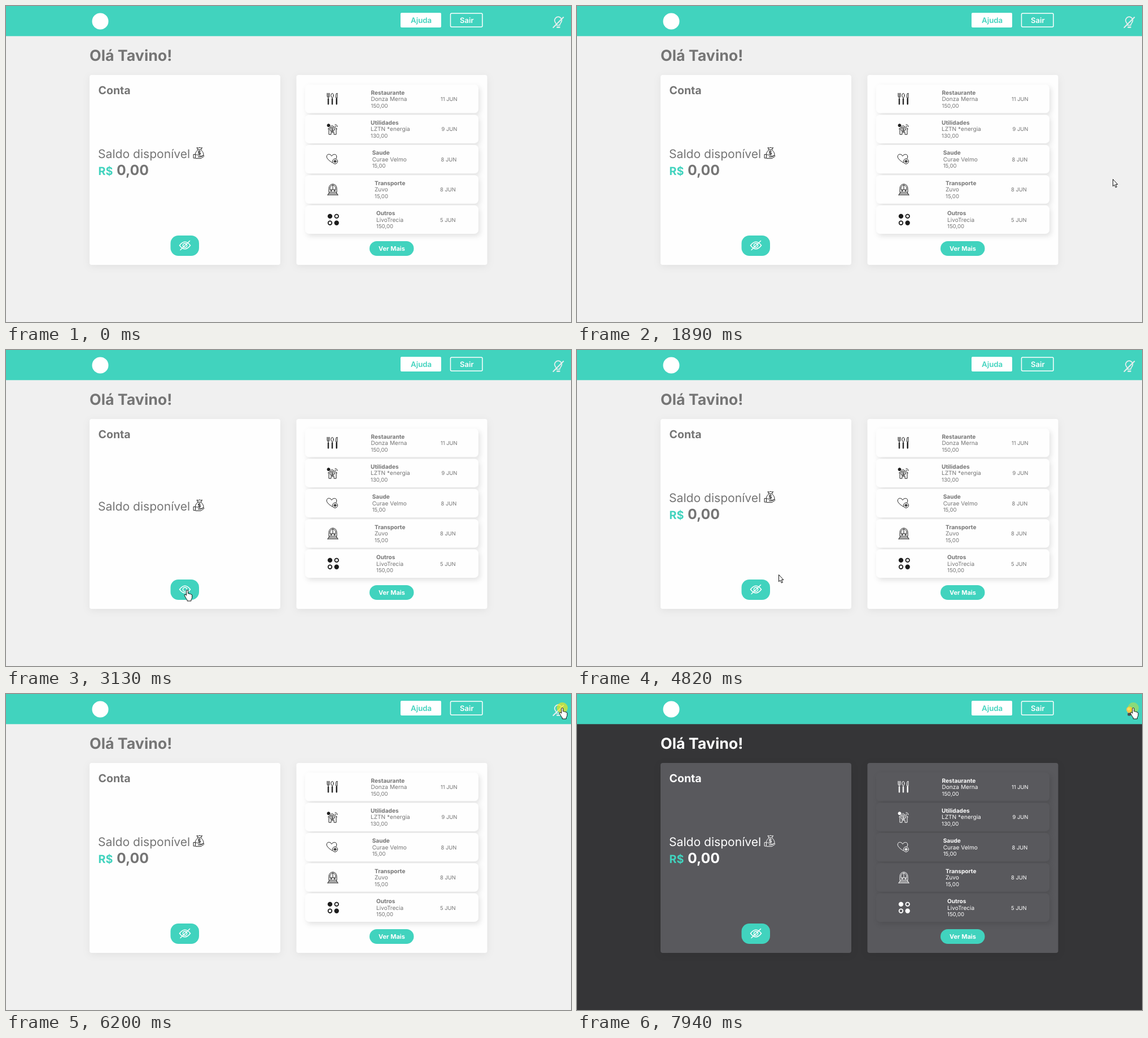
Recreate the animation shown at these times as an HTML page. Size 1001x559 px, loop 8000 ms.

```html
<!DOCTYPE html>
<html lang="pt-BR">
<head>
<meta charset="utf-8">
<title>Conta</title>
<style>
html, body { margin: 0; width: 100%; height: 100%; overflow: hidden; }
svg { display: block; width: 100vw; height: 100vh; font-family: Inter, sans-serif; text-rendering: geometricPrecision;
  --page: #f0f0f0; --card: #fefefe; --text: #757575; --ink: #1d1d1d; }
svg.dark { --page: #353537; --card: #59595d; --text: #fff; --ink: #fff; }
.page { fill: var(--page); }
.card { fill: var(--card); filter: drop-shadow(0 3px 7px #0000000f); }
.row { fill: var(--card); filter: drop-shadow(3px 4px 5px #0000001c); }
text { fill: var(--text); }
.teal { fill: #41d3be; }
.white { fill: #fff; }
.bold { font-weight: 700; }
.semi { font-weight: 600; }
.icon { fill: none; stroke: var(--ink); stroke-width: 1; stroke-linecap: round; stroke-linejoin: round; }
.icon .solid { fill: var(--ink); }
.icon text { fill: var(--ink); stroke: none; font-weight: 700; text-anchor: middle; }
.line { fill: none; stroke: #fff; stroke-width: 1.5; stroke-linecap: round; }
.pointer { fill: #fff; stroke: #111; stroke-width: 1; stroke-linejoin: round; }
</style>
</head>
<body>
<svg id="stage" viewBox="0 0 1001 559" preserveAspectRatio="none">
  <rect class="page" width="1001" height="559"/>
  <rect class="teal" width="1001" height="53.3"/>
  <circle class="white" cx="167" cy="27" r="14.5"/>

  <rect class="white" x="699" y="12" width="72" height="26" rx="2"/>
  <text class="teal semi" x="717" y="29.7" font-size="13.3">Ajuda</text>
  <rect class="line" x="787.5" y="13" width="56.5" height="24" rx="2"/>
  <text class="white semi" x="804" y="29.7" font-size="13.1">Sair</text>

  <g id="bulbOff" fill="none" stroke="#e9eeee" stroke-width="1.7" stroke-linecap="round">
    <path d="M975.5 34C975 30 972 29 972 25.5a6.3 6.3 0 0 1 12.6 0C984.600 29 981.500 30 981 34Z"/>
    <path d="M976.500 37.500h4" stroke-width="2.500"/>
    <path d="M969.500 38L987.500 20" stroke-width="2"/>
  </g>
  <g id="bulbOn">
    <path d="M976 33.500c0-2-2.700-3-2.700-6a5.300 5.300 0 0 1 10.600 0c0 3-2.700 4-2.700 6z" fill="#fbc04a"/>
    <circle cx="977.500" cy="26.500" r="2.500" fill="#ffdc83"/>
    <rect x="975.500" y="33.500" width="6" height="5" rx="1.500" fill="#4b4b50"/>
  </g>

  <text class="bold" x="148" y="97" font-size="26.8">Olá Tavino!</text>

  <rect class="card" x="148" y="122" width="338" height="336" rx="4"/>
  <text class="bold" x="163.500" y="155.500" font-size="19.500">Conta</text>
  <g id="balance">
    <text x="163" y="269.300" font-size="21.100">Saldo disponível</text>
    <g class="icon">
      <path d="M340 254.500h5.500M340 254.500l-2-4 3 1 2-1.500 2 1.500 2.500-1-2 4c2.500 2.500 4.500 5.500 4.500 8 0 2.500-2 3.500-4 3.500M340 254.500c-3 2.500-4.500 5-4.500 7.500"/>
      <path d="M332.500 262.500h3v6.500h-3zM335.500 263.500c3-1.500 4 .5 6 1.500h3c1.500 0 1.500 2 0 2h-4M345 266.500l4-2c2-.7 2.500 1 1 2l-5 3.200h-9"/>
      <text x="342.500" y="263" font-size="9">$</text>
    </g>
  </g>
  <g id="amount">
    <text class="teal bold" x="163.500" y="299" font-size="19.700">R$</text>
    <text class="bold" x="196" y="299" font-size="24.800">0,00</text>
  </g>
  <rect class="teal" x="291.500" y="406" width="50.500" height="36" rx="14"/>
  <g class="line">
    <path d="M307.500 423.500q9.500-12.500 19 0q-9.500 12.500-19 0z"/>
    <circle cx="317" cy="423.500" r="3.600"/>
    <path id="slash" d="M309 431.500L325.500 415.500"/>
  </g>

  <rect class="card" x="514.500" y="122" width="338" height="336" rx="4"/>
  <g id="rows"></g>
  <rect class="teal" x="644" y="416" width="78.500" height="26" rx="13"/>
  <text class="white bold" x="660" y="433" font-size="11">Ver Mais</text>

  <circle id="click" r="9.700" fill="#f5e614"/>
  <path id="arrow" class="pointer" d="M.5.5v12.300l2.800-2.500 2 4.700 2-.9-2-4.500h3.600z"/>
  <path id="hand" class="pointer" d="M-1.500 1.500q0-1.500 1.500-1.500t1.500 1.500v5q1.500-1 2.500.5 1.500-.8 2.500.8 2-.5 2.200 1.500v4q-.2 2-1.700 3.700v2.500h-7v-2q-2-2-3-4.500l-2-3.500q0-2 2-1.500l1.500 1.700z"/>
</svg>
<script>
const $ = id => document.getElementById(id);
const handle = x => `<rect class="solid" x="${x - .7}" y="-1" width="1.400" height="11" rx=".7"/>`;
const dot = (x, y, solid) => `<circle cx="${x}" cy="${y}" r="3.300" stroke-width="1.800" ${solid ? 'class="solid"' : ''}/>`;

const icons = {
  cutlery: `<path d="M-9-10v5q0 2.500 2 2.500t2-2.500v-5M-7-10v7M6.500-2v-5q0-3 2.500-3v8z"/>
    <ellipse cy="-6" rx="2.200" ry="3.700"/>${handle(-7)}${handle(0)}${handle(7.7)}`,
  house: `<path d="M-7.500 0L-.5-6.500 8.500 0M-6-1v10.500h4v-4h5v4h4V-1M5-8q4 0 4 4M5-5.500q1.500 0 1.500 1.500"/>
    <circle cy=".5" r="4"/><circle class="solid" cx="-6.500" cy="-6.500" r="2.500"/><text y="3" font-size="7">$</text>`,
  health: `<path d="M0 6C-8 1-11-3-9.500-6.500-8-10-3-9.500-1-5.500 1-9.500 6-9.500 7.500-6.500q1 2.500-.5 5"/>
    <circle cx="5" cy="3.700" r="4.500"/><circle cx="5" cy="3.700" r="1.800"/><path d="M5 1.500v4.500M2.700 3.700h4.600"/>`,
  train: `<path d="M-6 4.500V-2a7 7.500 0 0 1 14 0v6.500zM-4 0V-2a5 5.500 0 0 1 10 0v2zM1-7.500V0M-5 5l-3 5M7 5l3 5M-6.500 7.500h15M-8 9.700h18"/>
    <circle cx="-2" cy="2.300" r="1"/><circle cx="4" cy="2.300" r="1"/>`,
  dots: dot(-4, -6, true) + dot(7.700, -6) + dot(-4, 5.800) + dot(7.700, 5.800, true),
};

const entries = [
  ['cutlery', 646.500, 'Restaurante', 'Donza Merna', '150,00', 770, '11 JUN'],
  ['house', 646, 'Utilidades', 'LZTN *energia', '130,00', 771.500, '9 JUN'],
  ['health', 648.700, 'Saude', 'Curae Velmo', '15,00', 770.500, '8 JUN'],
  ['train', 653, 'Transporte', 'Zuvo', '15,00', 769, '8 JUN'],
  ['dots', 656, 'Outros', 'LivoTrecia', '150,00', 769, '5 JUN'],
];
$('rows').innerHTML = entries.map(([icon, x, kind, place, value, dateX, date], i) => `
  <g transform="translate(0 ${139 + 53.400 * i})">
    <rect class="row" x="530" width="307" height="50.500" rx="7"/>
    <g class="icon" transform="translate(578 25.300)">${icons[icon]}</g>
    <text class="bold" x="${x}" y="17.500" font-size="10.100">${kind}</text>
    <text x="${x}" y="29" font-size="10.100">${place}</text>
    <text x="${x}" y="40.500" font-size="9.600">${value}</text>
    <text x="${dateX}" y="29" font-size="9.400">${date}</text>
  </g>`).join('');

const LOOP = 8000, STEP = 70;
const moveStarts = [860, 1890, 4680];
// Pointer way: time, x, y
const way = [
  [860, 990, 543], [1070, 984, 470], [1280, 968, 372], [1490, 953, 318], [1630, 950, 308],
  [1890, 949, 306], [2100, 830, 248], [2310, 520, 231], [2450, 290, 305], [2590, 213, 412],
  [2660, 232, 441], [2730, 285, 432], [2800, 318, 426], [2870, 321, 424.500],
  [4610, 321, 424.500], [4680, 328, 417], [4820, 357, 397], [5030, 482, 318], [5240, 700, 187],
  [5450, 888, 84], [5590, 938, 53], [5730, 968, 35], [5940, 985.500, 24.500],
];
const clicks = [[3000, 3130, .5], [4130, 4280, .5], [6200, 6330, .65], [7940, 8000, .4]];

const show = (id, on) => { $(id).style.display = on ? '' : 'none'; };

function pointerAt(time) {
  const start = moveStarts.findLast(s => s <= time);
  const t = start + Math.floor((time - start) / STEP) * STEP;
  const next = way.findIndex(p => p[0] > t);
  if (next < 0) return way.at(-1).slice(1);
  const [t0, x0, y0] = way[next - 1], [t1, x1, y1] = way[next];
  const k = (t - t0) / (t1 - t0);
  return [x0 + (x1 - x0) * k, y0 + (y1 - y0) * k];
}

function draw(time) {
  const dark = time >= 6330;
  const hidden = time >= 3130 && time < 4280;
  $('stage').classList.toggle('dark', dark);
  show('bulbOn', dark);
  show('bulbOff', !dark);
  show('amount', !hidden);
  show('slash', !hidden);
  $('balance').setAttribute('transform', `translate(0 ${hidden ? 14.700 : 0})`);

  const visible = time >= 860;
  const [x, y] = visible ? pointerAt(time) : [0, 0];
  const overEye = x > 291 && x < 342 && y > 406 && y < 442;
  const overBulb = x > 967 && y < 40;
  const pointing = overEye || overBulb;
  show('arrow', visible && !pointing);
  show('hand', visible && pointing);
  for (const id of ['arrow', 'hand', 'click']) $(id).setAttribute('transform', `translate(${x} ${y})`);

  const click = clicks.find(([from, to]) => time >= from && time < to);
  show('click', click);
  if (click) $('click').style.opacity = click[2];
}

const begin = performance.now();
function tick() {
  draw((performance.now() - begin) % LOOP);
  requestAnimationFrame(tick);
}
tick();
</script>
</body>
</html>
```
